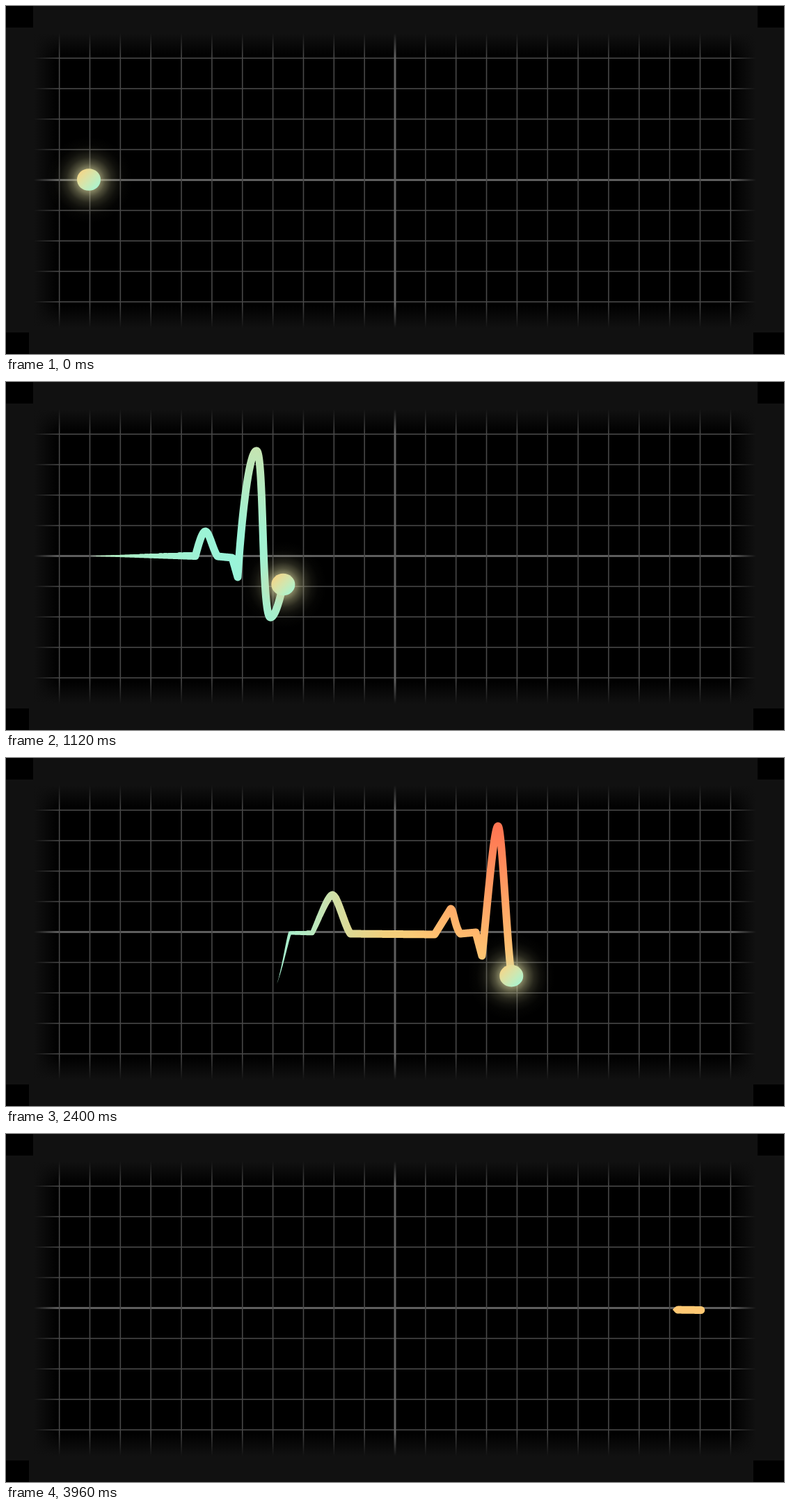
These frames come from a looping animation (1118 by 501 pixels, 4 s). An HTML page with a canvas:

```html
<!DOCTYPE html>
<html>
<head>
<meta charset="utf-8">
<title>Heartbeat</title>
<style>
  html, body { margin: 0; width: 100%; height: 100%; overflow: hidden; background: #111; }
  canvas { position: absolute; left: 0; top: 0; }
</style>
</head>
<body>
<canvas id="grid" width="1118" height="501"></canvas>
<canvas id="trace" width="1118" height="501"></canvas>
<script>
const W = 1118, H = 501, LOOP = 4000, STEP = 40;
const LINE_WIDTH = 11, TAPER = 0.2, SAMPLES_PER_PX = 2;
const grid = document.getElementById('grid').getContext('2d');
const ctx = document.getElementById('trace').getContext('2d');

const withStops = (gradient, stops) => {
  stops.forEach(([at, color]) => gradient.addColorStop(at, color));
  return gradient;
};
const radial = (c, x, y, r, stops) => withStops(c.createRadialGradient(x, y, 0, x, y, r), stops);
const linear = (c, x0, y0, x1, y1, stops) => withStops(c.createLinearGradient(x0, y0, x1, y1), stops);

function drawGrid() {
  const cx = 559, cy = 250.5, cell = 43.85;
  const bar = (x, y, w, h, color) => {
    grid.fillStyle = color;
    grid.fillRect(x - w / 2, y - h / 2, w, h);
  };
  grid.fillStyle = '#000';
  grid.fillRect(0, 0, W, H);
  for (let k = -4; k <= 4; k++) if (k) bar(cx, cy + k * cell, W, 1.6, '#484848');
  bar(cx, cy, W, 3, '#5e5e5e');
  for (let k = -11; k <= 11; k++) if (k) bar(cx + k * cell, cy, 1.6, H, '#484848');
  bar(cx, cy, 3, H, '#5e5e5e');

  // Fade the panel into its grey frame.
  const edge = (x1, y1, size, from, to) => {
    grid.fillStyle = linear(grid, 0, 0, x1, y1, [
      [from[0] / size, '#111'], [from[1] / size, '#1110'],
      [to[0] / size, '#1110'], [to[1] / size, '#111']]);
    grid.fillRect(0, 0, W, H);
  };
  edge(W, 0, W, [40, 76], [1042, 1078]);
  edge(0, H, H, [39, 73], [429, 463]);

  grid.fillStyle = '#000';
  grid.fillRect(0, 0, 39, 31);
  grid.fillRect(1080, 0, 38, 31);
  grid.fillRect(0, 470, 33, 31);
  grid.fillRect(1074, 470, 44, 31);
}

const pulse = document.createElementNS('http://www.w3.org/2000/svg', 'path');
pulse.setAttribute('d', `M119 250.5 L272 250.5
  C275 241 281 215 286.5 215 C292 215 297 241 304 251 L325 253 L333 281
  C338 200 349 99 360 99 C371 99 367 339 380 339 C391 339 402 270 408 252 L440 252
  C446 241 462 197 469 197 C476 197 487 243 495 253 L616 254
  L639 217 C643 217 645 244 653 253 L675 251 L684 285
  C692 210 701 98 707 98 C714 98 722 339 732 339 C739 339 747 270 756 252 L791 252
  C798 240 809 205 817 205 C825 205 836 239 844 252 L885 252 L999 253.5`);
const length = pulse.getTotalLength();
const points = Array.from({ length: Math.floor(length * SAMPLES_PER_PX) + 1 },
  (_, i) => pulse.getPointAtLength(i / SAMPLES_PER_PX));
const last = points.length - 1;

const baseColor = linear(ctx, 100, 0, 1000, 0, [
  [0.02, '#b6e9ba'], [0.11, '#a6efca'], [0.245, '#98f5da'], [0.34, '#a8eecb'],
  [0.378, '#b8e8bf'], [0.41, '#cfdfa8'], [0.44, '#dfd993'], [0.495, '#f2cf7c'],
  [0.573, '#ffc873'], [1, '#ffc873']]);
const greenTop = radial(ctx, 359, 60, 160, [[0, '#d0e0a8'], [1, '#d0e0a800']]);
const redTop = radial(ctx, 707, 75, 220, [[0, '#ff7050'], [0.12, '#ff7050ee'], [1, '#ff705000']]);

const headKeys = [[0, 0], [600, 0.194], [1120, 0.3731], [1520, 0.5058],
  [2000, 0.6613], [2840, 0.9449], [3005, 1]];
function headAt(t) {
  const i = headKeys.findIndex(([time]) => time > t);
  if (i < 0) return 1;
  const [t0, v0] = headKeys[i - 1], [t1, v1] = headKeys[i];
  return v0 + (v1 - v0) * (t - t0) / (t1 - t0);
}
const tailAt = t => Math.max(0, (t - 1515) / 2495);

function drawLine(tail, head) {
  const taperEnd = Math.round(tail + (head - tail) * TAPER);
  ctx.fillStyle = ctx.strokeStyle = baseColor;
  ctx.beginPath();
  for (let i = Math.ceil(tail); i < taperEnd; i++) {
    const { x, y } = points[i], r = LINE_WIDTH / 2 * (i - tail) / (taperEnd - tail);
    ctx.moveTo(x + r, y);
    ctx.arc(x, y, r, 0, 2 * Math.PI);
  }
  ctx.fill();

  ctx.lineWidth = LINE_WIDTH;
  ctx.lineCap = ctx.lineJoin = 'round';
  ctx.beginPath();
  // Start with a flat end so that the taper stays pointed.
  for (let i = taperEnd; i <= head; i++) ctx.lineTo(points[i].x, points[i].y);
  ctx.stroke();

  ctx.globalCompositeOperation = 'source-atop';
  for (const tint of [greenTop, redTop]) {
    ctx.fillStyle = tint;
    ctx.fillRect(0, 0, W, H);
  }
  ctx.globalCompositeOperation = 'source-over';
}

function drawDot({ x, y }, opacity) {
  const glow = [[0, 0.7], [0.25, 0.62], [0.38, 0.36], [0.52, 0.17], [0.66, 0.07], [0.8, 0.02], [1, 0]];
  ctx.globalAlpha = opacity;
  ctx.fillStyle = radial(ctx, x, y, 63, glow.map(([at, a]) => [at, `rgba(218,216,160,${a})`]));
  ctx.fillRect(x - 63, y - 63, 126, 126);
  ctx.fillStyle = linear(ctx, x - 12, y - 12, x + 12, y + 12, [[0, '#f3d78a'], [0.5, '#d2e6ae'], [1, '#aaf4d0']]);
  ctx.beginPath();
  ctx.ellipse(x, y - 0.5, 17, 15.8, 0, 0, 2 * Math.PI);
  ctx.fill();
  ctx.globalAlpha = 1;
}

function draw() {
  const t = Math.floor(performance.now() % LOOP / STEP) * STEP;
  const head = Math.round(headAt(t) * last);
  ctx.clearRect(0, 0, W, H);
  if (head > 0) drawLine(tailAt(t) * last, head);
  const opacity = Math.min(1, 1 - (t - 3000) / 200);
  if (opacity > 0) drawDot(points[head], opacity);
  requestAnimationFrame(draw);
}

drawGrid();
draw();
</script>
</body>
</html>
```
